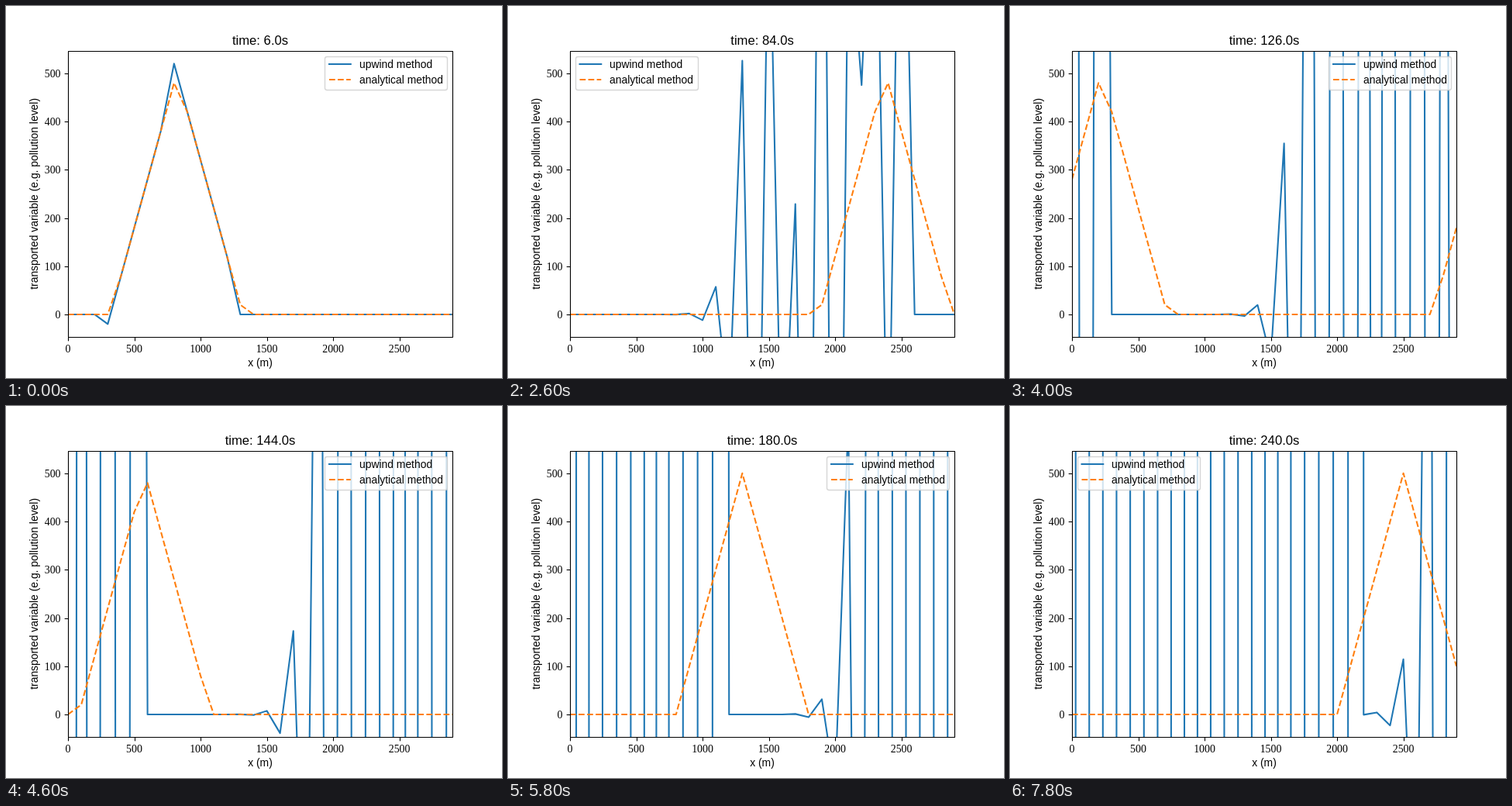
An HTML page with a canvas for the animation above (8000 ms loop, 640x480 px).

```html
<!DOCTYPE html>
<html lang="en">
<head>
<meta charset="utf-8">
<title>Advection</title>
<style>
  html, body { margin: 0; width: 100%; height: 100%; overflow: hidden; background: #fff; }
  canvas { display: block; }
</style>
</head>
<body>
<canvas id="plot" width="640" height="480"></canvas>
<script>
const ctx = document.getElementById('plot').getContext('2d');

const STEP_MS = 200, STEPS = 40, DT = 6, SPEED = 20;
const CELLS = 30, DX = 100, LENGTH = CELLS * DX, COURANT = SPEED * DT / DX;
const AXES = { left: 80, right: 576, top: 57.6, bottom: 427.2 };
const BLUE = '#1f77b4', ORANGE = '#ff7f0e';
const SANS = '"Liberation Sans", Arial, sans-serif';
const SERIF = '"Liberation Serif", "Times New Roman", serif';
const EM = 13.89, LINE_WIDTH = 2.083, DASH = [7.708, 3.333];
const LEGEND = { w: 157.6, h: 43.5, pad: EM / 2 };

const toX = x => AXES.left + x * (AXES.right - AXES.left) / 2900;
const toY = q => AXES.bottom - (q + 47) * (AXES.bottom - AXES.top) / 594;
const snap = v => Math.floor(v + 0.5) + 0.5;
const toPoints = values => values.map((q, i) => [toX(i * DX), toY(q)]);

// Periodic triangular pulse carried along without distortion.
function analytical(time) {
  const centre = (700 + SPEED * time) % LENGTH;
  return Array.from({ length: CELLS }, (_, i) => {
    const d = Math.abs(i * DX - centre);
    return Math.max(0, 500 - Math.min(d, LENGTH - d));
  });
}

// The Courant number exceeds one, so the upwind scheme blows up.
const upwindStep = q => q.map((v, i) => v - COURANT * (v - q[(i + CELLS - 1) % CELLS]));

function segmentHitsBox([x1, y1], [x2, y2], b) {
  const cx = b.x + b.w / 2, cy = b.y + b.h / 2;
  const dx = x2 - x1, dy = y2 - y1;
  return Math.abs(x1 + x2 - 2 * cx) < Math.abs(dx) + b.w &&
    Math.abs(y1 + y2 - 2 * cy) < Math.abs(dy) + b.h &&
    2 * Math.abs((x1 - cx) * dy - (y1 - cy) * dx) < b.w * Math.abs(dy) + b.h * Math.abs(dx);
}

// Picks the legend position that covers the fewest points and lines.
function placeLegend(lines) {
  const { w, h, pad } = LEGEND;
  const l = AXES.left + pad, r = AXES.right - pad - w, c = (l + r) / 2;
  const t = AXES.top + pad, b = AXES.bottom - pad - h, m = (t + b) / 2;
  const spots = [[r, t], [l, t], [l, b], [r, b], [r, m], [l, m], [r, m], [c, b], [c, t], [c, m]];
  let best, least = Infinity;
  for (const [x, y] of spots) {
    const box = { x, y, w, h };
    let badness = 0;
    for (const line of lines) {
      badness += line.filter(p => p[0] > x && p[0] < x + w && p[1] > y && p[1] < y + h).length;
      if (line.some((p, i) => i && segmentHitsBox(line[i - 1], p, box))) badness++;
    }
    if (badness < least) { least = badness; best = box; }
  }
  return best;
}

const frames = [];
let state = analytical(0);
for (let n = 1; n <= STEPS; n++) {
  state = upwindStep(state);
  const upwind = toPoints(state), exact = toPoints(analytical(n * DT));
  frames.push({ time: n * DT, upwind, exact, legend: placeLegend([upwind, exact]) });
}

function text(str, x, y, align = 'center', size = EM, family = SANS) {
  ctx.font = `${size}px ${family}`;
  ctx.textAlign = align;
  ctx.fillStyle = '#000';
  ctx.fillText(str, x, y);
}

function polyline(points, color, width, dash = []) {
  ctx.beginPath();
  points.forEach(p => ctx.lineTo(...p));
  ctx.strokeStyle = color;
  ctx.lineWidth = width;
  ctx.lineJoin = 'round';
  ctx.setLineDash(dash);
  ctx.stroke();
  ctx.setLineDash([]);
}

function drawAxes(time) {
  const left = snap(AXES.left), top = snap(AXES.top), bottom = snap(AXES.bottom);
  ctx.strokeStyle = '#000';
  ctx.lineWidth = 1.11;
  ctx.strokeRect(left, top, snap(AXES.right) - left, bottom - top);
  for (let v = 0; v <= 2500; v += 500) {
    const x = snap(toX(v));
    polyline([[x, bottom], [x, bottom + 4.86]], '#000', 1.11);
    text(v, toX(v), 447, 'center', EM, SERIF);
  }
  for (let v = 0; v <= 500; v += 100) {
    const y = snap(toY(v));
    polyline([[left, y], [left - 4.86, y]], '#000', 1.11);
    text(v, 70.5, Math.round(toY(v)) + 5, 'right', EM, SERIF);
  }
  text(`time: ${time.toFixed(1)}s`, 328, 50, 'center', 16.67);
  text('x (m)', 328, 465);
  ctx.save();
  ctx.translate(41, 242.4);
  ctx.rotate(-Math.PI / 2);
  text('transported variable (e.g. pollution level)', 0, 0);
  ctx.restore();
}

function drawLegend({ x, y, w, h }) {
  const left = snap(x), top = snap(y);
  ctx.beginPath();
  ctx.roundRect(left, top, snap(x + w) - left, snap(y + h) - top, 2.78);
  ctx.fillStyle = 'rgba(255,255,255,.8)';
  ctx.fill();
  ctx.strokeStyle = 'rgba(204,204,204,.8)';
  ctx.lineWidth = 1.39;
  ctx.stroke();
  const start = x + 5.56, end = start + 2 * EM;
  [['upwind method', BLUE], ['analytical method', ORANGE, DASH]].forEach(([label, color, dash], i) => {
    const rowY = Math.round(y + 10.5) + 20 * i;
    const cap = dash ? 0 : 1;
    polyline([[start - cap, rowY], [end + cap, rowY]], color, LINE_WIDTH, dash);
    text(label, Math.round(end + 11.1), rowY + 5, 'left');
  });
}

function draw(now) {
  const frame = frames[Math.floor(now / STEP_MS) % STEPS];
  ctx.fillStyle = '#fff';
  ctx.fillRect(0, 0, 640, 480);
  ctx.save();
  ctx.beginPath();
  ctx.rect(80, 58, 496, 369);
  ctx.clip();
  polyline(frame.upwind, BLUE, LINE_WIDTH);
  polyline(frame.exact, ORANGE, LINE_WIDTH, DASH);
  ctx.restore();
  drawAxes(frame.time);
  drawLegend(frame.legend);
}

const startTime = performance.now();
function tick() {
  draw(performance.now() - startTime);
  requestAnimationFrame(tick);
}
tick();
</script>
</body>
</html>
```
